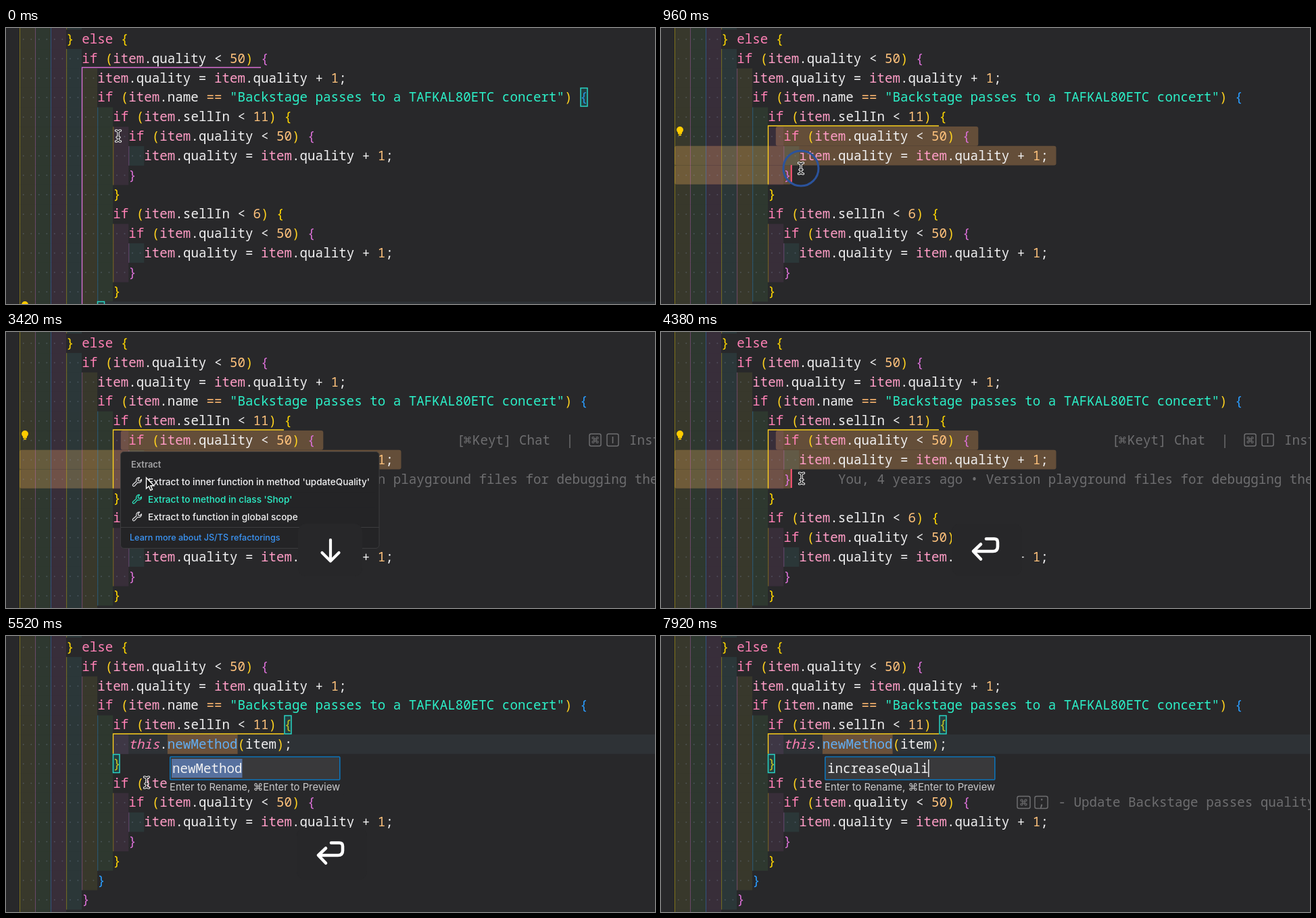
An HTML page that plays this animation: 960x409 px, repeating every 8000 ms.

```html
<!DOCTYPE html>
<html lang="en">
<head>
<meta charset="utf-8">
<title>Extract method refactoring</title>
<style>
html, body { margin: 0; width: 100%; height: 100%; overflow: hidden; background: #28282a; }
svg { display: block; }
#stage { width: 100%; height: 100%; }
text { white-space: pre; fill: #f1f1f2; }
.code, .code text { font: 500 19.2px "Noto Sans Mono", "DejaVu Sans Mono", monospace; }
.ui text { font: 500 13.6px Inter, Roboto, sans-serif; }
.kw { fill: #ff80b5; }
.this { fill: #ff80b5; font-style: italic; }
.obj { fill: #ff9dc6; }
.str { fill: #2cf0c8; }
.num { fill: #ffc27c; }
.op { fill: #ffb870; }
.fn { fill: #62aef5; }
.par { fill: #ffd21f; }
.b0 { fill: #ffd700; } .b1 { fill: #da70d6; } .b2 { fill: #2a9dff; }
.ghost text { fill: #6e6e70; font-weight: 400; }
.ghost rect, .ghost path { fill: none; stroke: #6e6e70; }
.match { fill: rgba(20, 130, 130, .25); stroke: #28d3c4; stroke-width: 1.5; }
.line { fill: #2e3236; }
.active { fill: none; stroke-width: 1.3; }
.sel { fill: #644e39; }
.key { fill: none; stroke: #fff; stroke-width: 4.6; stroke-linecap: round; stroke-linejoin: round; }
.panel { fill: #272729; stroke: none; }
.menu .pick { fill: #2cf0c8; }
.icon { fill: none; stroke: #e4e4e6; stroke-width: 1.2; stroke-linejoin: round; }
.pick .icon { stroke: #2cf0c8; }

/* everything below shares one 8 s clock */
.t { opacity: 0; animation: 8s step-end infinite; }
#before { animation-name: before; }
#selection, #scope { animation-name: scope; }
#ring { animation-name: ring; animation-timing-function: linear; }
#bulb { animation-name: bulb; }
#hints { animation-name: hints; }
#old { animation-name: old; }
#new { animation-name: new; }
#rename { animation-name: rename; }
#fresh { animation-name: fresh; }
#typed { animation-name: typed; }
#tip { animation-name: tip; }
#menu, #arrow { animation-name: menu; }
#pick1 { animation-name: pick1; }
#pick2 { animation-name: pick2; }
#keys { animation-name: keys; }
#down { animation-name: down; }
#enter { animation-name: enter; animation-timing-function: linear; }
#beam { animation-name: beam; }
@keyframes before { 0% { opacity: 1 } 3% { opacity: 0 } }
@keyframes scope { 3% { opacity: 1 } 57.5% { opacity: 0 } }
@keyframes ring { 0%, 3% { opacity: 0 } 3.7%, 12.3% { opacity: 1 } 14%, 100% { opacity: 0 } }
@keyframes bulb { 11.25% { opacity: 1 } 57.5% { opacity: 0 } }
@keyframes hints { 15% { opacity: 1 } 57.5% { opacity: 0 } }
@keyframes old { 0% { opacity: 1 } 57.5% { opacity: 0 } }
@keyframes new { 57.5% { opacity: 1 } 100% { opacity: 1 } }
@keyframes rename { 60.75% { opacity: 1 } 100% { opacity: 1 } }
@keyframes fresh { 0% { opacity: 1 } 77.5% { opacity: 0 } }
@keyframes typed { 77.5% { opacity: 1 } 100% { opacity: 1 } }
@keyframes tip { 86.25% { opacity: 1 } 100% { opacity: 1 } }
@keyframes menu { 18.75% { opacity: 1 } 51% { opacity: 0 } }
@keyframes pick1 { 0% { opacity: 1 } 38.25% { opacity: 0 } }
@keyframes pick2 { 38.25% { opacity: 1 } 100% { opacity: 1 } }
@keyframes keys { 18% { opacity: 1 } 37.5% { opacity: 0 } }
@keyframes down { 37.5% { opacity: 1 } 51% { opacity: 0 } }
@keyframes enter { 0%, 51% { opacity: 0 } 51.01%, 70.5% { opacity: 1 } 72.75%, 100% { opacity: 0 } }
@keyframes beam { 0% { opacity: 1 } 18.75% { opacity: 0 } 51% { opacity: 1 } 77.5% { opacity: 0 } }

#mouse { animation: mouse 8s infinite; }
@keyframes mouse {
  0%, 1% { transform: translate(166px, 160px); animation-timing-function: ease-out }
  3% { transform: translate(170px, 160px); animation-timing-function: ease-in-out }
  10%, 12% { transform: translate(207px, 208px); animation-timing-function: ease-in-out }
  15%, 100% { transform: translate(208px, 217px) }
}
#s5 { animation: s5 8s step-end infinite; }
#s6 { animation: s6 8s step-end infinite; }
#s7 { animation: s7 8s step-end infinite; }
#caret { animation: caret 8s step-end infinite; }
@keyframes s5 { 0% { width: 0 } 4% { width: 11.5px } 5.7%, 100% { width: 299.5px } }
@keyframes s6 { 0% { width: 0 } 5.7% { width: 161.3px } 7% { width: 172.8px } 8.5%, 100% { width: 564.5px } }
@keyframes s7 { 0% { width: 0 } 8.5%, 100% { width: 172.8px } }
@keyframes caret {
  0% { transform: translate(170px, 146px) }
  4% { transform: translate(181.3px, 146px) }
  5.7% { transform: translate(181.3px, 175px) }
  7% { transform: translate(191.8px, 175px) }
  8.5%, 100% { transform: translate(191.8px, 203px) }
}
#cover { animation: type 8s infinite; }
@keyframes type {
  0%, 77.5% { transform: translateX(0); animation-timing-function: steps(13, start) }
  99%, 100% { transform: translateX(149.8px) }
}
</style>
</head>
<body>
<svg id="stage" viewBox="0 0 960 409" preserveAspectRatio="none">
  <defs>
    <path id="cmd" d="M9 9V6a3 3 0 1 0-3 3h12a3 3 0 1 0-3-3v12a3 3 0 1 0 3-3H6a3 3 0 1 0 3 3z"/>
    <path id="wrench" d="M14.5 4.2a4.2 4.2 0 0 1-5.8 4.6L4.2 13.8a1.6 1.6 0 0 1-2.4-2.3L6.9 7A4.2 4.2 0 0 1 11.6 1.4L9.4 4l.4 2.2 2.2.4z"/>
    <path id="ibeam" d="M-3.5-8Q-.5-8 0-5.5Q.5-8 3.5-8M0-5.5V5.5M-3.5 8Q-.5 8 0 5.5Q.5 8 3.5 8M-2 2H2"/>
    <g id="lamp">
      <path d="M-5-2a5 5 0 1 1 10 0q0 2-2 4v2h-6v-2q-2-2-2-4z" fill="#ffcc00"/>
      <path d="M-2 5.5h4" stroke="#ffcc00" stroke-width="2"/>
    </g>
  </defs>

  <rect width="960" height="409" fill="#28282a"/>
  <g id="selection" class="t">
    <rect id="s5" class="sel" x="169.8" y="146" width="0" height="28.8" rx="3"/>
    <rect id="s6" class="sel" x="20" y="174.8" width="0" height="28.6" rx="3"/>
    <rect id="s7" class="sel" x="20" y="203.4" width="0" height="28.4" rx="3"/>
  </g>
  <g id="top" class="code"></g>
  <g id="old" class="t code"></g>

  <g id="before" class="t">
    <rect class="line" x="146" y="405.5" width="814" height="4"/>
    <path class="active" stroke="#da70d6" d="M377 58.5H112.5V409"/>
    <rect class="match" x="850" y="89" width="10" height="27"/>
    <rect class="match" x="135.5" y="405.5" width="10" height="27"/>
    <use href="#lamp" x="28" y="412"/>
  </g>

  <g id="scope" class="t">
    <path class="active" stroke="#ffd21f" d="M411 145H158.5V231.5"/>
    <rect id="caret" width="2" height="28" fill="#ff5577"/>
  </g>
  <g id="bulb" class="t"><use href="#lamp" x="28" y="153"/></g>

  <g id="hints" class="t code ghost">
    <text x="667" y="167">[</text>
    <use href="#cmd" transform="translate(676.5 154) scale(.5)" fill="none" stroke="#6e6e70" stroke-width="2.4"/>
    <text x="690" y="167">Keyt] Chat  |</text>
    <rect x="863" y="151" width="17" height="18" rx="2.5" stroke-width="1.5"/>
    <use href="#cmd" transform="translate(865.5 154) scale(.5)" fill="none" stroke="#6e6e70" stroke-width="2.4"/>
    <rect x="889" y="151" width="17" height="18" rx="2.5" stroke-width="1.5"/>
    <path d="M897.5 155V165" stroke-width="1.6"/>
    <text x="922" y="167">Instruct</text>
    <text x="262" y="224.6">You, 4 years ago • Version playground files for debugging the</text>
  </g>

  <g id="new" class="t">
    <rect class="line" x="158" y="146" width="802" height="28.8"/>
    <rect x="238.9" y="146" width="103.7" height="28.8" fill="#6a513b"/>
    <g id="after" class="code"></g>
    <path class="active" stroke="#ffd21f" d="M411 145H158.5V174.5"/>
    <rect class="match" x="412" y="118" width="10" height="27"/>
    <rect class="match" x="158.5" y="175.5" width="9.5" height="27"/>
  </g>

  <g id="tip" class="t code ghost">
    <rect x="527" y="237.5" width="19" height="18" rx="2.5" stroke-width="1.5"/>
    <use href="#cmd" transform="translate(530.5 240.5) scale(.5)" fill="none" stroke="#6e6e70" stroke-width="2.4"/>
    <rect x="553" y="237.5" width="19" height="18" rx="2.5" stroke-width="1.5"/>
    <text x="557" y="252">;</text>
    <text x="587.4" y="253.4">- Update Backstage passes quality</text>
  </g>

  <g id="rename" class="t">
    <rect x="238" y="175.5" width="264" height="59" rx="4" fill="#28282a"/>
    <rect x="242.8" y="179" width="251" height="34" rx="1" fill="#39393b" stroke="#0d73b8" stroke-width="1.6"/>
    <g id="fresh" class="t code">
      <rect x="245" y="182" width="104.5" height="28" fill="#57719f"/>
      <text x="246" y="203">newMethod</text>
    </g>
    <g id="typed" class="t">
      <svg x="244" y="180" width="249" height="32" class="code">
        <text x="2" y="23">increaseQuali</text>
        <g id="cover">
          <rect x="2" y="0" width="260" height="32" fill="#39393b"/>
          <rect x="1.2" y="3" width="1.5" height="26" fill="#fff"/>
        </g>
      </svg>
    </g>
    <g class="ui"><text x="242" y="229" style="font-size:14.8px;font-weight:400;fill:#c9c9cb">Enter to Rename, ⌘Enter to Preview</text></g>
  </g>

  <g id="menu" class="t ui menu">
    <rect x="169.5" y="177.5" width="382.5" height="143" rx="5" fill="#242426" stroke="#3c3c3e"/>
    <path d="M170 289.5H552" stroke="#3c3c3e"/>
    <text x="185" y="200.5" style="font-size:12.9px;font-weight:600;fill:#a4a4a6">Extract</text>
    <g id="items"></g>
    <text x="183" y="309" style="font-size:12.6px;fill:#3b95f5">Learn more about JS/TS refactorings</text>
  </g>

  <g id="keys" class="t key">
    <rect class="panel" x="387" y="284" width="191" height="80" rx="12"/>
    <path d="M419 308H430L445 338H456M442 308H456"/>
    <use href="#cmd" transform="translate(459.5 299) scale(2)" stroke-width="2.2"/>
    <text x="505" y="340" stroke="none" style="font:600 46px Inter,Roboto,sans-serif;fill:#fff">M</text>
  </g>
  <g id="down" class="t key">
    <rect class="panel" x="432" y="284" width="95" height="78" rx="12"/>
    <path d="M480 308V339M467.5 327L480 339.5 492.5 327" stroke-width="4.2"/>
  </g>
  <g id="enter" class="t key">
    <rect class="panel" x="430" y="284" width="104" height="77" rx="12"/>
    <path d="M481 306.5H493Q498 306.5 498 311.5V318Q498 325 491 325H463M473 314.5L462 325 473 336.5"/>
  </g>

  <g id="mouse">
    <circle id="ring" class="t" r="26" fill="none" stroke="#2b539c" stroke-width="3"/>
    <g id="beam" class="t" fill="none" stroke-linecap="round">
      <use href="#ibeam" stroke="#fff" stroke-width="3.4"/>
      <use href="#ibeam" stroke="#1c1c1e" stroke-width="1.3"/>
    </g>
    <path id="arrow" class="t" d="M-.5-1V15L3.2 11.7 5.8 17.6 8.5 16.4 5.9 10.7H10.8z" fill="#111" stroke="#fff" stroke-width="1.4"/>
  </g>
</svg>
<script>
const CH = 11.52, ROW = 28.8, LEFT = 20, TOP = 2.3;
const stripes = ['255,255,64', '127,255,127', '255,127,255', '79,236,236'];
const guides = ['#ffd700', '#da70d6', '#2a9dff'];
const kinds = ['str', 'kw', 'this', 'fn', 'obj', 'num', 'op', 'par', 'brace'];
const lexer = /("[^"]*")|\b(if|else)\b|(this)|(newMethod)|(item(?=\.))|(\d+)|(==)|([()])|([{}])|[^]/g;
const byId = id => document.getElementById(id);
const esc = s => s.replace(/</g, '&lt;');

function paint(src, col) {
  return src.replace(lexer, (all, ...m) => {
    const k = kinds.findIndex((_, i) => m[i] !== undefined);
    if (k < 0) return esc(all);
    const cls = kinds[k] === 'brace' ? 'b' + col / 2 % 3 : kinds[k];
    return `<tspan class="${cls}">${esc(all)}</tspan>`;
  });
}

function row(i, col, src) {
  const y = TOP + i * ROW, end = LEFT + col * CH;
  let out = '';
  for (let c = 0; c < col; c += 2) {
    const x = LEFT + c * CH;
    out += `<rect x="${x}" y="${y}" width="${2 * CH}" height="${ROW}" fill="rgba(${stripes[c / 2 % 4]},.075)"/>` +
      `<rect x="${x}" y="${y}" width="1" height="${ROW}" fill="${guides[c / 2 % 3]}" opacity=".36"/>`;
  }
  out += `<path d="M${LEFT + CH / 2} ${y + ROW / 2}H${end - 1}" stroke="#8fa0b8" stroke-opacity=".27" stroke-width="2" stroke-linecap="round" stroke-dasharray="0 ${CH}"/>`;
  return out + `<text xml:space="preserve" x="${end}" y="${y + 20.7}">${paint(src, col)}</text>`;
}

// each line is [indent, text]
const fill = (id, first, lines) =>
  byId(id).innerHTML = lines.map(([col, src], i) => row(first + i, col, src)).join('');

const bump = [16, 'item.quality = item.quality + 1;'];
const guard = [14, 'if (item.quality < 50) {'];
const late = [[12, 'if (item.sellIn < 6) {'], guard, bump, [14, '}'], [12, '}'], [10, '}']];

fill('top', -1, [
  [8, '}'],
  [6, '} else {'],
  [8, 'if (item.quality < 50) {'],
  [10, bump[1]],
  [10, 'if (item.name == "Backstage passes to a TAFKAL80ETC concert") {'],
  [12, 'if (item.sellIn < 11) {']
]);
fill('old', 5, [guard, bump, [14, '}'], [12, '}'], ...late]);
fill('after', 5, [[14, 'this.newMethod(item);'], [12, '}'], ...late, [8, '}'], [6, '}']]);

const choices = ["inner function in method 'updateQuality'", "method in class 'Shop'", 'function in global scope'];
const choice = (i, cls) => {
  const y = 227.3 + i * 25.6;
  return `<g class="${cls}"><use href="#wrench" class="icon" transform="translate(186 ${y - 13})"/>` +
    `<text class="${cls}" x="210" y="${y}">Extract to ${choices[i]}</text></g>`;
};
const picked = i => `<g id="pick${i + 1}" class="t"><rect x="184" y="${212 + i * 25.6}" width="362" height="22" fill="#242426"/>${choice(i, 'pick')}</g>`;
byId('items').innerHTML = choices.map((_, i) => choice(i, '')).join('') + picked(0) + picked(1);
</script>
</body>
</html>
```
